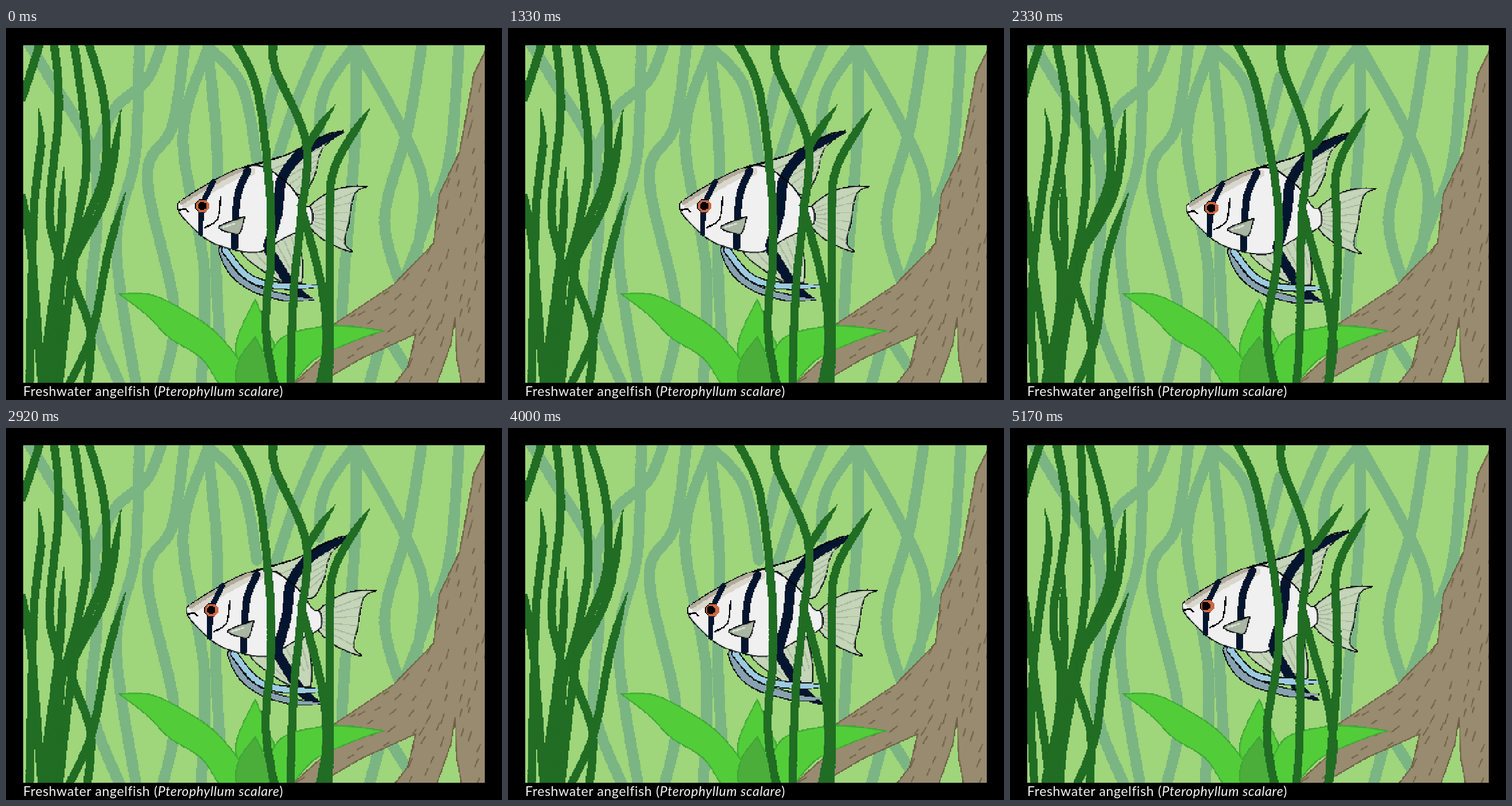
Animation of 864 by 648 pixels, one loop 5.33 s. Source, as an HTML page with a canvas:

```html
<!DOCTYPE html>
<html lang="en">
<head>
<meta charset="utf-8">
<title>Freshwater angelfish</title>
<style>
  html, body { margin: 0; width: 100%; height: 100%; overflow: hidden; background: #000; }
  #tank { position: absolute; left: 30px; top: 30px; width: 804px; height: 588px; overflow: hidden; }
  canvas { display: block; width: 805px; height: 588px; image-rendering: pixelated; }
  p {
    position: absolute; left: 30px; top: 618px; margin: 0; line-height: 28px; white-space: nowrap;
    font-family: Lato, "Open Sans", sans-serif; font-size: 23px; letter-spacing: 0.65px; color: #f4f4f4;
  }
</style>
</head>
<body>
<div id="tank"><canvas id="view" width="460" height="336"></canvas></div>
<p>Freshwater angelfish (<i>Pterophyllum scalare</i>)</p>
<script>
const CELL = 1.75, W = 460, H = 336, LOOP = 5330;
const INK = '#05070c', NAVY = '#04162f', FIN = '#c4d5b8', RAY = '#a9b7a0';
const WEED = '#216d24', MIST = '#7bb583', BARK = '#988b70', BARK_LINE = '#6d5d43';
const LEAF = '#53cc3a', LEAF_LINE = '#3da633';

function layer() {
  const c = document.createElement('canvas');
  c.width = W;
  c.height = H;
  return c.getContext('2d', { willReadFrequently: true });
}
const scratch = layer();

// Draws in stage units, then hardens the edges to whole cells.
function stamp(target, draw) {
  const s = scratch;
  s.clearRect(0, 0, W, H);
  s.save();
  s.scale(1 / CELL, 1 / CELL);
  s.translate(-30, -30);
  s.lineCap = s.lineJoin = 'round';
  draw(s);
  s.restore();
  const img = s.getImageData(0, 0, W, H), d = img.data;
  for (let i = 3; i < d.length; i += 4) d[i] = d[i] > 115 ? 255 : 0;
  s.putImageData(img, 0, 0);
  target.drawImage(s.canvas, 0, 0);
}

const mix = (a, b, t) => a + (b - a) * t;

function points(text) {
  const n = text.trim().split(/\s+/).map(Number);
  return n.filter((_, i) => i % 2 === 0).map((x, i) => [x, n[2 * i + 1]]);
}

function spline(p, step = 14) {
  const at = i => p[Math.max(0, Math.min(p.length - 1, i))], out = [];
  for (let i = 0; i < p.length - 1; i++) {
    const [a, b, c, d] = [at(i - 1), at(i), at(i + 1), at(i + 2)];
    for (let k = 0; k < step; k++) {
      const t = k / step;
      out.push([0, 1].map(j => b[j] + 0.5 * t * (c[j] - a[j] +
        t * (2 * a[j] - 5 * b[j] + 4 * c[j] - d[j] + t * (3 * (b[j] - c[j]) + d[j] - a[j])))));
    }
  }
  return [...out, at(p.length - 1)];
}

function trace(s, pts) {
  s.beginPath();
  pts.forEach(q => s.lineTo(q[0], q[1]));
}

function shape(target, text, fill, line) {
  const pts = points(text);
  stamp(target, s => {
    trace(s, spline([...pts, pts[0]]));
    s.closePath();
    s.fillStyle = fill;
    s.fill();
    s.strokeStyle = line;
    s.lineWidth = 2;
    s.stroke();
  });
}

// A ribbon through key points; with a taper it narrows towards its first point.
function ribbon(target, color, width, text, taper = 0, bend = q => q) {
  const pts = spline(points(text)).map(bend);
  stamp(target, s => {
    s.strokeStyle = color;
    let run = 3;
    for (let i = 1; i < pts.length; i++) {
      const [a, b] = [pts[i - 1], pts[i]];
      run += Math.hypot(b[0] - a[0], b[1] - a[1]);
      s.lineWidth = width * Math.min(1, run / (taper || 1));
      trace(s, [a, b]);
      s.stroke();
    }
  });
}

// Rays from one edge to another, each edge given by its two ends.
function fan(target, text, count) {
  const [a, b, c, d] = points(text);
  stamp(target, s => {
    s.strokeStyle = RAY;
    s.lineWidth = 2;
    for (let i = 0; i < count; i++) {
      const t = (i + 0.5) / count;
      trace(s, [[mix(a[0], b[0], t), mix(a[1], b[1], t)], [mix(c[0], d[0], t), mix(c[1], d[1], t)]]);
      s.stroke();
    }
  });
}

function drawTrunk(g) {
  const edge = points(`838 34 815 80 790 215 755 290 745 375 675 447 570 517 555 570 497 622
    540 622 620 575 714 533 700 590 676 622 750 622 775 550 782 505 785 575 794 622 840 622`);
  let seed = 7;
  const rnd = () => (seed = seed * 16807 % 2147483647) / 2147483647;
  stamp(g, s => {
    trace(s, edge);
    s.closePath();
    s.fillStyle = BARK;
    s.fill();
    s.strokeStyle = BARK_LINE;
    s.lineWidth = 2;
    s.stroke();
    s.clip();
    for (let y = 60; y < 620; y += 28) {
      for (let x = 510; x < 840; x += 27) {
        const px = x + rnd() * 22, py = y + rnd() * 22, len = 9 + rnd() * 9;
        const lean = py > 540 && px > 680 ? 0.2 : Math.max(0, Math.min(1, (770 - px) / 110));
        const a = 1.85 + 0.75 * lean;
        trace(s, [[px, py], [px + len * Math.cos(a), py + len * Math.sin(a)]]);
        s.stroke();
      }
    }
  });
}

function makeScene() {
  const g = layer();
  g.fillStyle = '#9fd57b';
  g.fillRect(0, 0, W, H);
  [
    '35 20 75 85 150 215 158 340 150 490 200 625',
    '232 20 225 220 192 380 227 625',
    '274 20 245 90 190 140 155 215',
    '312 20 290 170 246 260 293 490 272 625',
    '350 40 308 190 345 420 340 625',
    '350 20 368 220 365 400 378 625',
    '355 35 412 103 437 230',
    '470 85 450 170',
    '552 20 505 130 470 235',
    '605 35 555 110 545 190',
    '610 20 608 200 590 420 585 510',
    '612 35 692 180 728 280 715 400',
    '726 20 700 175 660 330 688 450',
    '790 20 772 230 735 330 692 445',
    '655 540 632 625', '662 535 700 595'
  ].forEach(path => ribbon(g, MIST, 19, path));
  drawTrunk(g);
  shape(g, '434 472 458 530 466 560 435 592 405 580 403 540', LEAF, LEAF_LINE);
  shape(g, `197 463 250 464 300 486 365 530 412 590 410 624 376 624 340 575 285 540
    245 500`, LEAF, LEAF_LINE);
  shape(g, '659 528 600 520 545 521 475 545 448 624 492 624 540 576 620 540', LEAF, LEAF_LINE);
  shape(g, '434 538 457 590 452 624 405 624 405 580', '#4bae3b', LEAF_LINE);
  return g.canvas;
}

function makeFish(back) {
  const g = layer();
  const stroke = (path, width = 2, color = INK) => ribbon(g, color, width, path);

  // Fins
  shape(g, '588 180 551 211 536 261 510 290 450 250 412 244 490 220 555 187', FIN, INK);
  fan(g, '450 246 512 284 560 200 538 252', 5);
  shape(g, '629 276 607 290 597 340 590 374 603 390 560 373 529 345 529 312 565 285 600 276', FIN, INK);
  fan(g, '534 312 534 344 608 278 588 380', 6);
  shape(g, '516 443 516 400 500 348 460 365 410 388 455 428 490 444', FIN, INK);
  fan(g, '425 392 504 362 468 434 515 410', 6);
  ribbon(g, NAVY, 17, '536 474 500 452 456 384', 38);

  // Trailing threads lift while the fish backs away
  const lift = back ? 8 : 0;
  const thread = (path, width, color) => {
    const bend = ([x, y]) => [x, y - lift * Math.min(1, (x - 376) / 70)];
    ribbon(g, INK, width + 4, path, 60, bend);
    ribbon(g, color, width, path, 60, bend);
  };
  thread('538 472 495 471 440 457 405 436 386 412 376 386', back ? 11 : 9, '#88a2b0');
  thread('554 449 500 450 450 445 415 428 381 386', 9, '#9ccbe0');

  // Body
  shape(g, `298 306 340 278 400 247 445 241 490 270 518 307 530 312 534 328 528 345 486 365
    440 390 385 383 345 365 305 326`, '#f0f0f0', INK);
  stroke('312 307 348 286 402 256 428 250', 13, '#d9d7cd');
  stroke('305 305 342 282 400 251 424 246', 6, '#b2ac9b');
  stroke('361 268 342 310 339 357', 9, NAVY);
  stroke('421 248 403 295 398 381', 12, NAVY);
  ribbon(g, NAVY, 17, '589 181 540 201 506 226 480 265 473 320 457 379', 55);
  stroke('412 244 490 220 555 187 588 179');
  stroke('455 243 490 270 508 292');
  stroke('300 318 311 315 317 320');
  stroke('374 293 368 333 345 348');
  shape(g, '416 328 371 346 392 357 407 357', '#aab6a4', INK);
  stroke('378 347 398 341', 2, '#dbe1d6');

  // Eye
  const octagon = (x, r, fill) => stamp(g, s => {
    s.beginPath();
    for (let i = 0.5; i < 8; i++) {
      const a = i * Math.PI / 4;
      s.lineTo(x + r * Math.cos(a), 310 + r * Math.sin(a));
    }
    s.fillStyle = fill;
    s.fill();
  });
  octagon(342, 13, INK);
  octagon(342, 11.7, '#cc6844');
  octagon(back ? 339 : 342, 7.5, '#000');
  return g.canvas;
}

// Sway phase, taper and key points of each weed.
const reeds = [
  [-2.4, 0, '61 20 47 65 28 122'],
  [-0.8, 0, '83 20 92 140 76 320 95 440 78 625'],
  [-4, 0, '118 20 140 210 126 330 95 450 68 625'],
  [-2.5, 0, '142 20 171 130 170 255 122 390 92 625'],
  [0, 0, '28 295 45 400 62 625'],
  [-1.3, 75, '57 140 61 200 48 330 41 625'],
  [-4.6, 75, '101 243 91 400 60 625'],
  [-1.8, 75, '200 143 174 290 122 395 114 430 147 530 141 625'],
  [-6.6, 75, '208 285 178 390 150 530 108 625'],
  [-2.7, 0, '397 20 437 107 458 270 461 400 452 520 468 625'],
  [1.2, 0, '467 20 469 70 523 200 514 330 501 460 495 625'],
  [-6.1, 0, '514 310 550 450 558 550 546 625'],
  [-0.1, 50, '574 133 548 170 525 205'],
  [-3.3, 50, '633 141 575 237 564 320 564 500 562 625']
];

function makeWeeds(sway) {
  const g = layer();
  for (const [phase, taper, path] of reeds) {
    ribbon(g, WEED, 14, path, taper, ([x, y]) => [x + sway * Math.sin(y / 80 + phase), y]);
  }
  return g.canvas;
}

const scene = makeScene();
const fish = [makeFish(false), makeFish(true)];
const weeds = [makeWeeds(0), makeWeeds(7)];
const view = document.getElementById('view').getContext('2d');

function frame(now) {
  // Twelve beats a second: weeds sway every four, the fish drifts every two.
  const beat = Math.floor((now % LOOP + 4) * 0.012);
  const back = beat >= 46;
  const drift = back ? 9 - ((beat - 46) >> 1)
    : Math.max(0, Math.min(10, ((beat - 19) >> 1) + 1));
  view.drawImage(scene, 0, 0);
  view.drawImage(fish[+back], drift, Math.floor(drift * 0.55));
  view.drawImage(weeds[(beat >> 2) & 1], 0, 0);
  requestAnimationFrame(frame);
}
frame(0);
</script>
</body>
</html>
```
